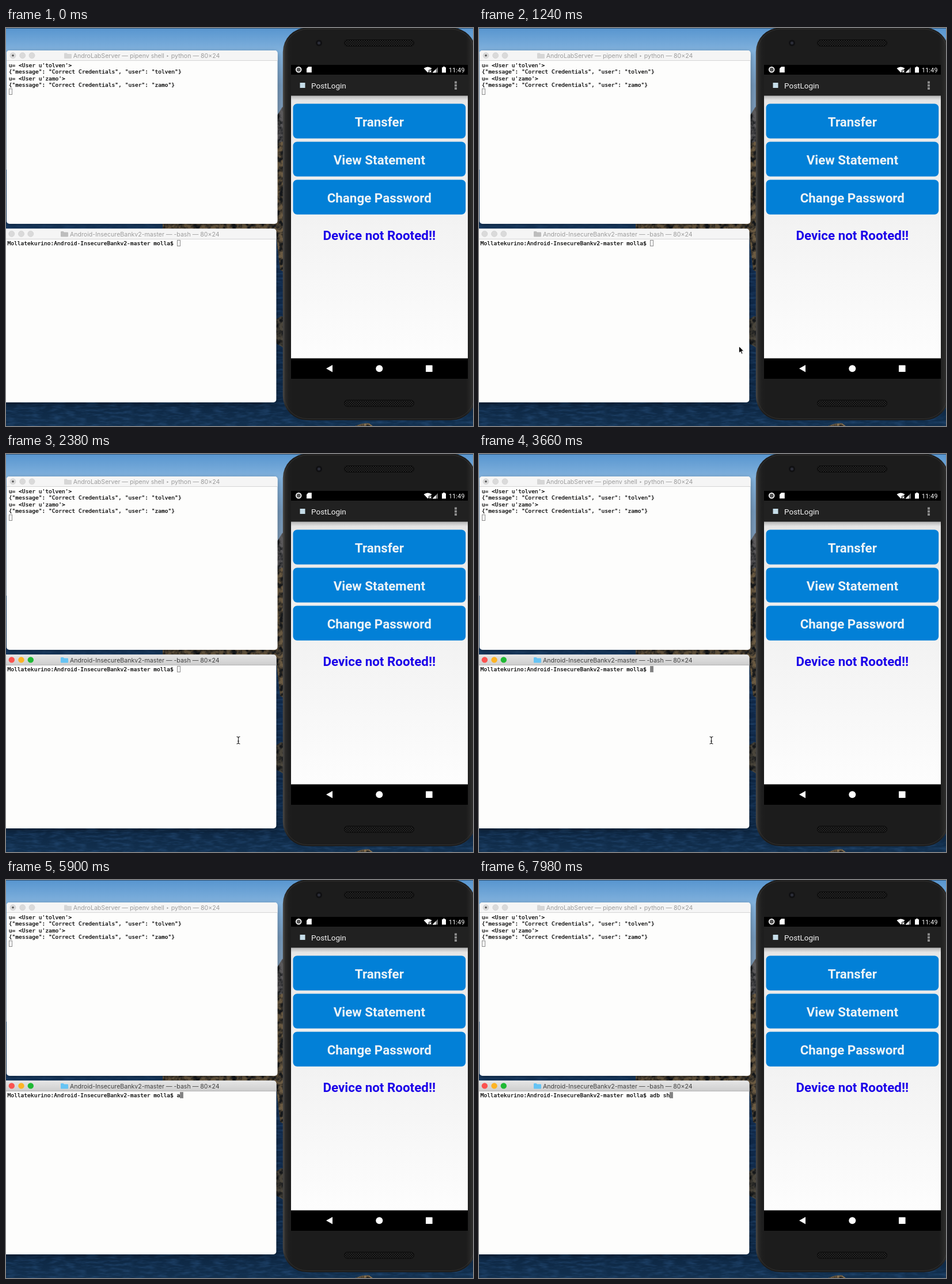
An HTML page that plays this animation: 811x691 px, repeating every 8 s.

```html
<!DOCTYPE html>
<html lang="en">
<head>
<meta charset="utf-8">
<title>Phone and terminals</title>
<style>
  html, body { margin: 0; width: 100%; height: 100%; overflow: hidden; background: #102c4a; }
  svg { position: absolute; left: 0; top: 0; display: block; }
  .title { font: 10.6px Inter, sans-serif; fill: #9c9c9c; }
  .app { font-family: Roboto, sans-serif; }
  .big { font-size: 22.4px; font-weight: 700; text-anchor: middle; }
  .term {
    position: absolute; margin: 0; white-space: pre; color: #000;
    font: 9.59px/11.55px "DejaVu Sans Mono", monospace;
    -webkit-text-stroke: .25px #000;
  }
  .prompt { display: flex; }
  .caret {
    display: inline-block; box-sizing: border-box; width: 6px; height: 11px;
    border: 1px solid #8c8c8c; vertical-align: top; flex: none;
  }

  .active, .typed, .live, .arrow, .beam { animation: 8s step-end infinite; }
  .active { opacity: 0; animation-name: activate; }
  .live { animation-name: fill; }
  .typed { overflow: hidden; width: 0; animation-name: type; }
  .arrow { animation-name: travel; animation-timing-function: ease-in-out; }
  .beam { opacity: 0; animation-name: beam; }

  @keyframes activate { 0% { opacity: 0 } 29.2%, 100% { opacity: 1 } }
  @keyframes fill { 0% { background: transparent } 30.4%, 100% { background: #828282 } }
  @keyframes beam { 0% { opacity: 0 } 29.2% { opacity: 1 } 72.5%, 100% { opacity: 0 } }
  @keyframes type {
    0% { width: 0 } 72.5% { width: 1ch } 78% { width: 2ch } 82.5% { width: 3ch }
    87.5% { width: 4ch } 93% { width: 5ch } 97.5%, 100% { width: 6ch }
  }
  @keyframes travel {
    0%, 4.5% { transform: translate(530px, 692px); opacity: 1 }
    7%, 11% { transform: translate(510px, 621px); opacity: 1 }
    19.5%, 29.19% { transform: translate(403px, 496px); opacity: 1 }
    29.2%, 100% { transform: translate(403px, 496px); opacity: 0 }
  }
</style>
</head>
<body>
<svg width="811" height="691" viewBox="0 0 811 691">
  <defs>
    <linearGradient id="sky" x2="0" y2="1">
      <stop stop-color="#5795cf"/><stop offset=".16" stop-color="#82b2dd"/>
      <stop offset=".4" stop-color="#7396b8"/><stop offset="1" stop-color="#8c9fb2"/>
    </linearGradient>
    <linearGradient id="sea" x2="0" y2="1">
      <stop stop-color="#1d4a78"/><stop offset=".4" stop-color="#10294a"/>
      <stop offset=".9" stop-color="#0c2541"/><stop offset="1" stop-color="#12304f"/>
    </linearGradient>
    <linearGradient id="body">
      <stop stop-color="#4c4a48"/><stop offset=".012" stop-color="#2c2b2a"/>
      <stop offset=".03" stop-color="#1f1f1f"/><stop offset=".05" stop-color="#1c1c1c"/>
      <stop offset=".95" stop-color="#1c1c1c"/><stop offset="1" stop-color="#353433"/>
    </linearGradient>
    <linearGradient id="page" x2="0" y2="1">
      <stop stop-color="#b4b4b4"/><stop offset=".018" stop-color="#e6e6e6"/>
      <stop offset=".5" stop-color="#f3f3f3"/><stop offset="1" stop-color="#fdfdfd"/>
    </linearGradient>
    <linearGradient id="bar" x2="0" y2="1">
      <stop stop-color="#e6e6e6"/><stop offset="1" stop-color="#cdcdcd"/>
    </linearGradient>
    <pattern id="mesh" width="4" height="4" patternUnits="userSpaceOnUse">
      <rect width="4" height="4" fill="#0b0b0b"/>
      <path d="M0 0L4 4M4 0L0 4" stroke="#303030" stroke-width=".7"/>
    </pattern>
    <filter id="waves" x="0" y="0" width="1" height="1" color-interpolation-filters="sRGB">
      <feTurbulence type="fractalNoise" baseFrequency=".05 .24" numOctaves="3" seed="4"/>
      <feColorMatrix values="0 0 0 0 .16  0 0 0 0 .32  0 0 0 0 .5  1.2 0 0 0 -.5"/>
    </filter>
    <filter id="stone" x="0" y="0" width="1" height="1" color-interpolation-filters="sRGB">
      <feTurbulence type="fractalNoise" baseFrequency=".12" numOctaves="3" seed="9"/>
      <feColorMatrix values="0 0 0 0 .08  0 0 0 0 .09  0 0 0 0 .1  3 0 0 0 -1.1"/>
      <feComposite in2="SourceAlpha" operator="in" result="dark"/>
      <feMerge><feMergeNode in="SourceGraphic"/><feMergeNode in="dark"/></feMerge>
    </filter>
    <filter id="shade" x="-10%" y="-10%" width="120%" height="125%">
      <feDropShadow dx="0" dy="3" stdDeviation="4" flood-opacity=".35"/>
    </filter>
    <path id="folder" d="M0 1.5Q0 .5 1 .5H4.5L6 2H12Q13 2 13 3V9Q13 10 12 10H1Q0 10 0 9Z"/>
    <g id="lights"><circle r="5"/><circle cx="16.7" r="5"/><circle cx="33" r="5"/></g>
  </defs>

  <!-- desktop -->
  <rect width="811" height="250" fill="url(#sky)"/>
  <rect width="811" height="1" fill="#2f5274"/>
  <rect y="246" width="811" height="445" fill="url(#sea)"/>
  <rect y="335" width="811" height="356" filter="url(#waves)"/>
  <g filter="url(#stone)">
    <path d="M440 190L472 150L480 137L500 140V250H440Z" fill="#5c5a5c"/>
    <path d="M272 349V335L430 215L500 190V432L476 420L468 349Z" fill="#6c5b42"/>
    <path d="M460 512L478 500L490 506V560L470 548Z" fill="#4c473c"/>
    <path d="M606 691L618 687L630 686L637 691Z" fill="#8a7352"/>
  </g>

  <!-- server window -->
  <g>
    <rect x="1" y="39" width="470.5" height="301" rx="5" fill="#fdfdfc" filter="url(#shade)"/>
    <path d="M1 56.5V44Q1 39 6 39H466.5Q471.5 39 471.5 44V56.5Z" fill="#f5f5f5"/>
    <path d="M1 56.5H471.5" stroke="#d5d5d5"/>
    <use href="#lights" x="12" y="47.8" fill="#dadada" stroke="#cbcbcb" stroke-width=".6"/>
    <circle cx="12" cy="47.8" r="1.8" fill="#555"/>
    <use href="#folder" x="101" y="43" fill="#d6d6d6"/>
    <text class="title" x="116.7" y="52">AndroLabServer — pipenv shell ‣ python — 80×24</text>
  </g>

  <!-- shell window -->
  <g>
    <rect x="-6" y="348.5" width="475.3" height="301.5" rx="5" fill="#fdfdfc" filter="url(#shade)"/>
    <path d="M0 366.5V348.5H464Q469.3 348.5 469.3 353.5V366.5Z" fill="#f5f5f5"/>
    <path d="M0 366.5H469.3" stroke="#d5d5d5"/>
    <use href="#lights" x="9.8" y="357.4" fill="#dadada" stroke="#cbcbcb" stroke-width=".6"/>
    <use href="#folder" x="95" y="352.5" fill="#bdbdbd"/>
    <text class="title" x="111" y="361.5">Android-InsecureBankv2-master — -bash — 80×24</text>
    <g class="active">
      <path d="M0 366.5V348.5H464Q469.3 348.5 469.3 353.5V366.5Z" fill="url(#bar)"/>
      <path d="M0 366.5H469.3" stroke="#b4b4b4"/>
      <circle cx="9.8" cy="357.4" r="5.2" fill="#fb524f"/>
      <circle cx="26.5" cy="357.4" r="5.2" fill="#fdb424"/>
      <circle cx="42.8" cy="357.4" r="5.2" fill="#1fb934"/>
      <use href="#folder" x="95" y="352.5" fill="#66c4f4"/>
      <text class="title" x="111" y="361.5" style="fill:#404040">Android-InsecureBankv2-master — -bash — 80×24</text>
    </g>
  </g>

  <!-- phone -->
  <g class="app">
    <rect x="480.8" y="-.5" width="335" height="681.5" rx="42" fill="url(#body)"/>
    <rect x="483.5" y="2" width="329.6" height="676.5" rx="40" fill="none" stroke="#403e3b" stroke-opacity=".6"/>
    <circle cx="543.5" cy="26" r="5.5" fill="#101012"/><circle cx="543.5" cy="26" r="2.6" fill="#2b2d38"/>
    <rect x="587.5" y="20.5" width="121" height="11" rx="5.5" fill="url(#mesh)" stroke="#090909"/>
    <rect x="587.5" y="646" width="121" height="11" rx="5.5" fill="url(#mesh)" stroke="#090909"/>
    <rect x="495" y="64" width="307" height="545"/>
    <rect x="495" y="81" width="307" height="36.5" fill="#212121"/>
    <rect x="495" y="117.5" width="307" height="456" fill="url(#page)"/>

    <circle cx="508.2" cy="72.3" r="4.4" fill="#555" stroke="#fff" stroke-width="1.7"/>
    <path d="M525 67.3H530.8V77.3H522V70.3Z" fill="#fff"/>
    <path d="M725.5 70Q732.5 65 739.5 70L732.5 77.5Z" fill="#fff"/>
    <path d="M734.5 73L739 77.5M739 73L734.5 77.5" stroke="#000" stroke-width="3"/>
    <path d="M735 73.5L738.5 77M738.5 73.5L735 77" stroke="#fff" stroke-width="1.2"/>
    <path d="M740.5 77.5L750 68V77.5Z" fill="#777"/><path d="M740.5 77.5L746.5 71.5V77.5Z" fill="#fff"/>
    <path d="M757 68.2H759V67H762V68.2H764V77.5H757Z" fill="#fff"/>
    <text x="768.7" y="76.6" font-size="11.2" fill="#f4f4f4">11:49</text>

    <rect x="510.5" y="95" width="9" height="9" fill="#c5dce8"/>
    <text x="530" y="104.8" font-size="13.5" fill="#f3f3f3">PostLogin</text>
    <path d="M779 92.5h4v4h-4zm0 5.3h4v4h-4zm0 5.3h4v4h-4z" fill="#8c8c8c"/>

    <g fill="#0280d7">
      <rect x="498.5" y="131.5" width="299.7" height="60.3" rx="7"/>
      <rect x="498.5" y="197.5" width="299.7" height="60.3" rx="7"/>
      <rect x="498.5" y="263.4" width="299.7" height="60.3" rx="7"/>
    </g>
    <g class="big" fill="#eef3f6">
      <text x="648.3" y="170.5">Transfer</text>
      <text x="648.3" y="236.5">View Statement</text>
      <text x="648.3" y="302.5">Change Password</text>
      <text x="648.3" y="368.4" fill="#1b00e9">Device not Rooted!!</text>
    </g>

    <g fill="#fff">
      <path d="M556 591.3L567 585V597.6Z"/>
      <circle cx="648.3" cy="591.3" r="6"/>
      <rect x="729" y="585.5" width="11.6" height="11.6" rx=".6"/>
    </g>
  </g>
</svg>

<pre class="term" style="left:4.8px;top:58.7px">u= &lt;User u'tolven'&gt;
{"message": "Correct Credentials", "user": "tolven"}
u= &lt;User u'zamo'&gt;
{"message": "Correct Credentials", "user": "zamo"}
<i class="caret"></i></pre>
<div class="term prompt" style="left:2.5px;top:368.2px"><span>Mollatekurino:Android-InsecureBankv2-master molla$ </span><span class="typed">adb sh</span><i class="caret live"></i></div>

<svg width="811" height="691" viewBox="0 0 811 691">
  <path class="arrow" d="M.5 .5V12.6L3.3 10L5.2 14.3L7.2 13.4L5.4 9.2H9Z" fill="#000" stroke="#fff" stroke-width="1"/>
  <path class="beam" d="M400.5 490.8Q403.5 490.8 403.5 493V501Q403.5 503.2 400.5 503.2M406.5 490.8Q403.5 490.8 403.5 493M403.5 501Q403.5 503.2 406.5 503.2M402 498.5H405" fill="none" stroke="#222" stroke-width="1.1"/>
</svg>
</body>
</html>
```
